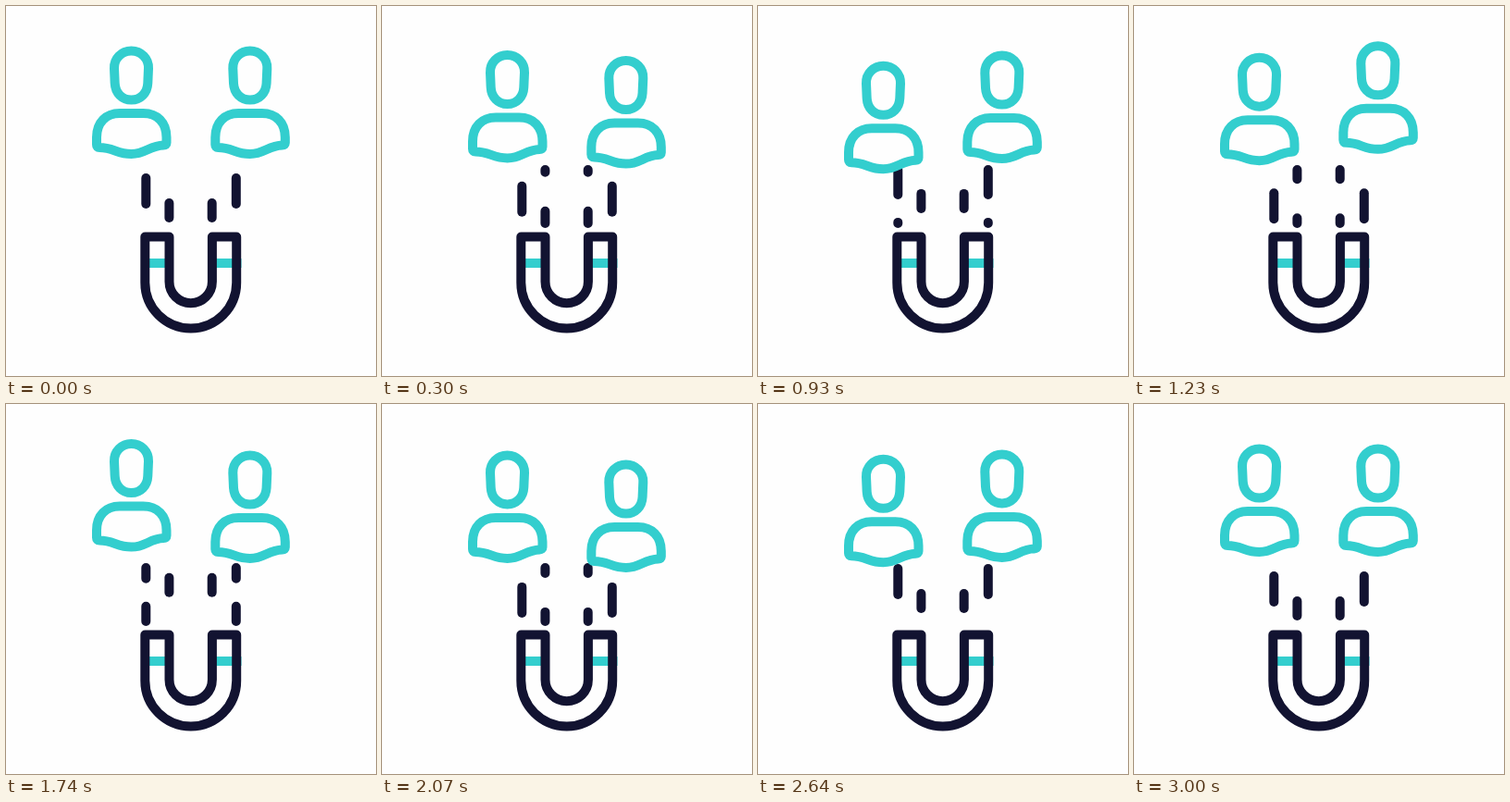
Animation of 400 by 400 pixels, one loop 3090 ms. Source, as an HTML page:

```html
<!DOCTYPE html>
<html lang="en">
<head>
<meta charset="utf-8">
<title>Magnet</title>
<style>
  html, body { margin: 0; width: 100%; height: 100%; overflow: hidden; background: #fefefe; }
  svg { display: block; width: 100vw; height: 100vh; }
  path, line { fill: none; stroke-width: 10; stroke-linecap: round; stroke-linejoin: round; }
  .navy { stroke: #121331; }
  .teal { stroke: #33cece; }
  .band { stroke-linecap: butt; }
  .long { stroke-dasharray: 28 30; }
  .short { stroke-dasharray: 16 42; }
</style>
</head>
<body>
<svg viewBox="0 0 400 400">
  <defs>
    <g id="person" class="teal">
      <path d="M135.5 48.5c10.6 0 18.9 8.4 18.5 19l-.7 16c-.5 10.5-7.8 18-17.8 18s-17.3-7.5-17.8-18l-.7-16c-.4-10.6 7.9-19 18.5-19z"/>
      <path d="M98 142C98 126 108 116 123 116H148.500C163.500 116 173.500 126 173.500 142V148Q173.500 150.500 170.500 150.500C155 151 151 160 135.500 160S116 153 101 153Q98 153 98 150z"/>
    </g>
  </defs>

  <path class="teal band" d="M154 278H174M226 278H254.500"/>
  <path class="navy" d="M150.300 249.500H176.500V298a23.200 23.200 0 0 0 46.400 0V249.500H249.200V299a49.450 49.450 0 0 1-98.900 0z"/>

  <g class="navy">
    <line class="long" x1="151.300" y1="177" x2="151.300" y2="235"/>
    <line class="long" x1="248.800" y1="177" x2="248.800" y2="235"/>
    <line class="short" x1="176.400" y1="177" x2="176.400" y2="235"/>
    <line class="short" x1="222.700" y1="177" x2="222.700" y2="235"/>
  </g>

  <use id="left" href="#person"/>
  <use id="right" href="#person"/>
</svg>

<script>
  const LOOP = 3090, END = 3000, STEP = 30, SPAN = 58;

  // [time, vertical offset], eased between stops
  const leftStops = [[0, 0], [880, 16.5], [1670, -6], [2410, 17], [END, 0]];
  const rightStops = [[0, 0], [515, 17], [1325, -6], [2090, 17], [END, 0]];
  // [time, turns of the dashes along their line]
  const flowStops = [[0, 0], [630, 0.495], [1230, 1.28], [1740, 2.565], [2070, 3.205], [2640, 3.863], [END, 4]];

  const $ = s => document.querySelector(s);
  const left = $('#left'), right = $('#right');
  const longs = document.querySelectorAll('.long');
  const shorts = document.querySelectorAll('.short');

  function slope(stops, i) {
    if (i === 0 || i === stops.length - 1) return 0;
    const [a, b] = [stops[i - 1], stops[i + 1]];
    return (b[1] - a[1]) / (b[0] - a[0]);
  }

  // Hermite curve; the stops are turning points unless smooth is set
  function at(stops, t, smooth) {
    let i = 0;
    while (i < stops.length - 2 && t >= stops[i + 1][0]) i++;
    const [t0, v0] = stops[i], [t1, v1] = stops[i + 1];
    const d = t1 - t0, u = (t - t0) / d;
    const ease = u * u * (3 - 2 * u);
    const value = v0 + (v1 - v0) * ease;
    if (!smooth) return value;
    return value + d * u * (1 - u) * ((1 - u) * slope(stops, i) - u * slope(stops, i + 1));
  }

  function setDash(lines, start, turns) {
    const offset = -((start + turns * SPAN) % SPAN);
    lines.forEach(l => l.style.strokeDashoffset = offset);
  }

  function draw(now) {
    const t = Math.min(END, Math.floor((now % LOOP) / STEP) * STEP);
    left.setAttribute('transform', `translate(0 ${at(leftStops, t)})`);
    right.setAttribute('transform', `translate(128.3 ${at(rightStops, t)})`);
    const turns = at(flowStops, t, true);
    setDash(longs, 9, turns);
    setDash(shorts, 36, turns);
  }

  const begin = performance.now();
  function tick() {
    draw(performance.now() - begin);
    requestAnimationFrame(tick);
  }
  tick();
</script>
</body>
</html>
```
